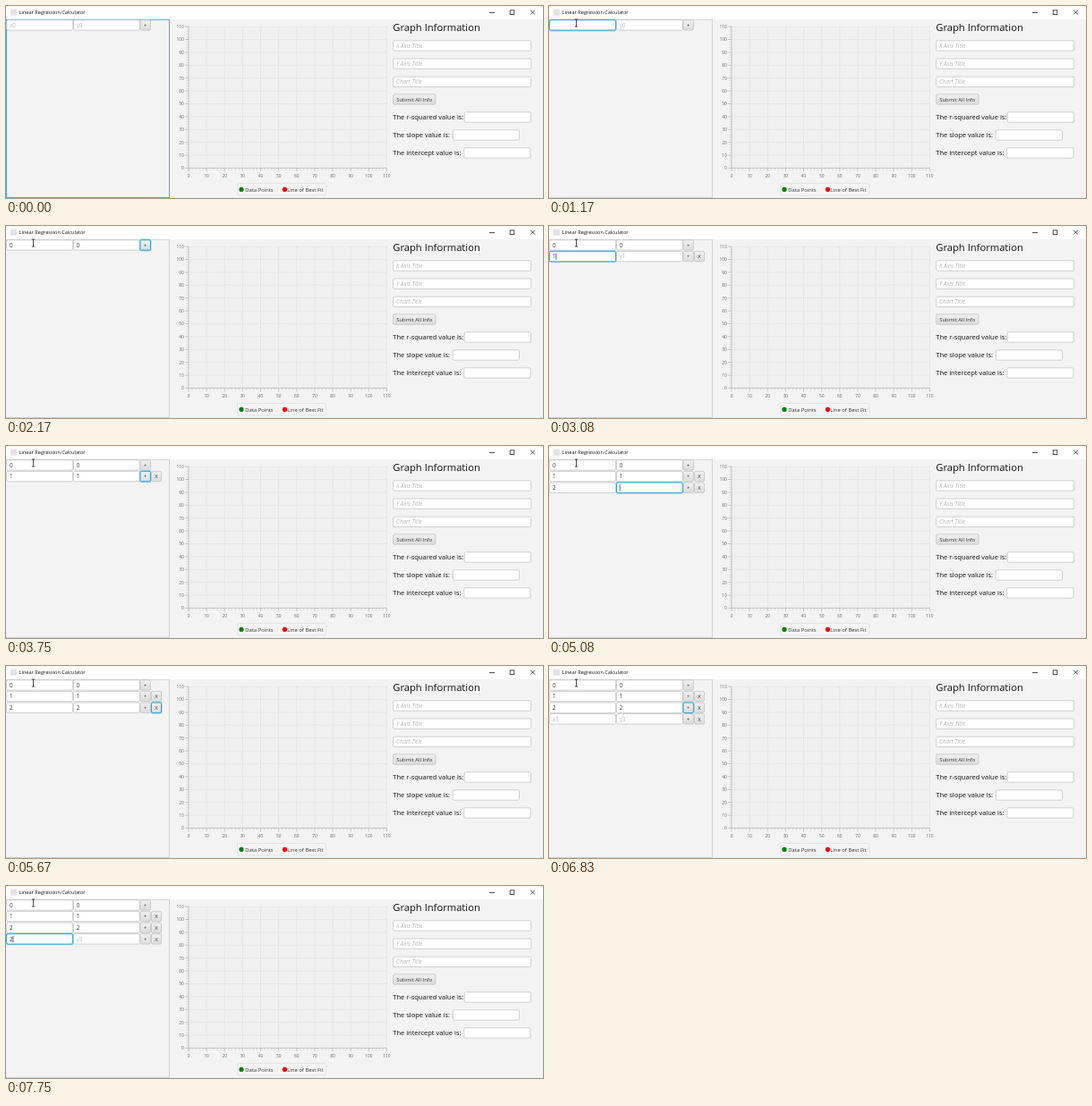
These frames come from a looping animation (600 px wide and 215 px high, 8 s). An HTML page:

```html
<!DOCTYPE html>
<html lang="en">
<head>
<meta charset="utf-8">
<title>Linear Regression Calculator</title>
<style>
html, body { margin: 0; width: 100%; height: 100%; overflow: hidden; background: #f4f3f4; }
svg { display: block; width: 600px; height: 215px; }
text { font-family: "Open Sans", "Noto Sans", sans-serif; fill: #333; white-space: pre; }
</style>
</head>
<body>
<svg id="stage" viewBox="0 0 600 215">
  <defs>
    <linearGradient id="face" x1="0" y1="0" x2="0" y2="1">
      <stop offset="0" stop-color="#f0f0f0"/><stop offset="1" stop-color="#dcdcdc"/>
    </linearGradient>
  </defs>
  <g id="base"></g>
  <g id="table"></g>
  <g id="pointer"></g>
</svg>
<script>
const LOOP = 8000;
const BLUE = '#1a9fc9';
const $ = id => document.getElementById(id);

const rect = (x, y, w, h, fill, stroke = 'none', rx = 0, sw = 1) =>
  `<rect x="${x}" y="${y}" width="${w}" height="${h}" rx="${rx}" fill="${fill}" stroke="${stroke}" stroke-width="${sw}"/>`;
const line = (d, stroke, sw = 1, extra = '') =>
  `<path d="${d}" fill="none" stroke="${stroke}" stroke-width="${sw}" ${extra}/>`;
const text = (x, y, size, str, fill = '#333', anchor = 'start', extra = '') =>
  `<text x="${x}" y="${y}" font-size="${size}" style="fill:${fill}" text-anchor="${anchor}" ${extra}>${str}</text>`;

function box(x, y, w, h, fill, focused) {
  const halo = focused ? rect(x - .2, y - .2, w + .4, h + .4, 'none', '#a5d9e9', 1.8, 1.6) : '';
  return halo + rect(x + .3, y + .3, w - .6, h - .6, fill, focused ? BLUE : '#bfbfbf', 1.4, focused ? .9 : .7);
}
const field = (x, y, w, focused) => box(x, y, w, 12, '#fff', focused);

function button(x, y, w, label, focused, pressed) {
  return box(x, y, w, 12, pressed ? '#cfcfcf' : 'url(#face)', focused) +
    text(x + w / 2, y + 8.2, 5.9, label, '#333', 'middle');
}

function titleBar() {
  return rect(0, 0, 600, 15, '#fff') +
    rect(5, 3.5, 7, 7, '#e6e2e6') +
    text(14.6, 9.3, 5.6, 'Linear Regression Calculator', '#111') +
    line('M540 7.5h6', '#222', .8) +
    rect(563.2, 4.8, 4.6, 4.6, 'none', '#222', 0, .8) +
    line('M586 4.6l5 5M591 4.6l-5 5', '#222', .8);
}

function chart() {
  const x0 = 204, y0 = 181.5, dx = 20.13, dy = 14.4;
  const right = x0 + 11 * dx, top = y0 - 11 * dy;
  let grid = '', major = '', minor = '', labels = '';
  for (let i = 0; i <= 11; i++) {
    const x = x0 + i * dx, y = y0 - i * dy;
    if (i) grid += `M${x} ${top}V${y0}M${x0} ${y}H${right}`;
    major += `M${x} ${y0}v4M${x0} ${y}h-4`;
    labels += text(x, 191.8, 4.8, i * 10, '#666', 'middle') + text(198.8, y + 1.8, 4.8, i * 10, '#666', 'end');
    for (let k = 1; k < 5 && i < 11; k++)
      minor += `M${x + k * dx / 5} ${y0}v2.5M${x0} ${y - k * dy / 5}h-2.5`;
  }
  return rect(x0, top, right - x0, y0 - top, '#f1f0f1') +
    line(grid, '#d8d6d8', .6, 'stroke-dasharray="1.5 1"') +
    line(minor, '#c4c4c4', .5) + line(major, '#a5a5a5', .6) +
    line(`M${x0} ${top}V${y0}H${right}`, '#b0b0b0', .7) + labels +
    rect(258.5, 198.5, 99, 13.5, '#f5f4f5', '#dedede', 2, .7) +
    '<circle cx="263" cy="205.4" r="2.6" fill="#008000"/>' + text(267.3, 207.5, 5.85, 'Data Points') +
    '<circle cx="311.5" cy="205.4" r="2.6" fill="#f00000"/>' + text(314.3, 207.5, 5.9, 'Line of Best Fit');
}

function form() {
  let out = text(432.3, 27.6, 11.2, 'Graph Information', '#111');
  ['X Axis Title', 'Y Axis Title', 'Chart Title'].forEach((name, i) => {
    const y = 38.5 + i * 20.2;
    out += field(432.3, y, 154.7) + text(436, y + 8.4, 6.4, name, '#b5b5b5', 'start', 'font-style="italic"');
  });
  out += button(432.3, 98.5, 48, 'Submit All Info');
  [['r-squared', 512, 74.8], ['slope', 499, 74.8], ['intercept', 511.4, 74.8]].forEach(([name, x, w], i) => {
    const y = 118.5 + i * 20;
    out += text(432.3, y + 8.5, 7.5, `The ${name} value is:`, '#111') + field(x, y, w);
  });
  return out;
}

// Focus moves: time, row, column (0 x, 1 y, 2 plus, 3 remove)
const focusAt = [
  [1000, 0, 0], [1830, 0, 1], [2170, 0, 2], [2750, 1, 0], [3250, 1, 1], [3670, 1, 2],
  [4080, 1, 3], [4250, 2, 0], [5000, 2, 1], [5420, 2, 2], [5670, 2, 3], [6580, 2, 2],
  [7080, 2, 3], [7330, 3, 0]
];
// Each row: time it appears, then x and y values with the time they are typed
const rows = [
  { from: 0, cells: [['0', 1580], ['0', 2000]] },
  { from: 2500, cells: [['1', 3080], ['1', 3420]] },
  { from: 3920, cells: [['2', 4830], ['2', 5250]] },
  { from: 6830, cells: [['2', 7750], ['', LOOP]] }
];
const presses = [[2330, 2500], [3830, 3920], [6750, 6830]];

function drawRow(row, r, t, focus) {
  const y = 15.4 + r * 12.65;
  const on = c => !!focus && focus[1] === r && focus[2] === c;
  let out = '', top = '';
  const put = (c, s) => on(c) ? top += s : out += s;
  row.cells.forEach(([value, typed], c) => {
    const x = c ? 75.2 : .4, has = t >= typed;
    let s = field(x, y, 74.3, on(c));
    if (has) s += text(x + 3.5, y + 8.3, 6.2, value);
    else if (!on(c)) s += text(x + 3.5, y + 8.3, 6.2, 'xy'[c] + r, '#b8b8b8');
    if (on(c) && t >= 1250) {
      const cx = x + (has ? 7.5 : 4);
      s += line(`M${cx} ${y + 2.4}v7.4`, '#222', .7);
    }
    put(c, s);
  });
  const down = on(2) && presses.some(([a, b]) => t >= a && t < b);
  put(2, button(149.7, y, 12, '+', on(2), down));
  if (r) put(3, button(162.2, y, 11.6, 'X', on(3)));
  return out + top;
}

function drawPointer(t) {
  if (t < 750) return '';
  const p = Math.min(1, (t - 750) / 250), e = 1 - (1 - p) ** 2;
  const x = 90 - 59.5 * e, y = 215 - 196 * e;
  if (y > 28)
    return `<path d="M${x} ${y}v8l1.9-1.8 1.3 3 1.2-.6-1.3-2.8h2.6z" fill="#fff" stroke="#111" stroke-width=".5"/>`;
  return line(`M${x - 1.6} ${y - 4}h3.2M${x} ${y - 4}v8M${x - 1.6} ${y + 4}h3.2`, '#222', .8);
}

function render(t) {
  const focus = focusAt.filter(f => t >= f[0]).pop();
  const pane = focus ? line('M0 15.2H182.5V214.5H0', '#cbcbcb', .8)
                     : rect(.5, 15.3, 182, 199.2, 'none', '#4bb0d0', 0, 1);
  $('table').innerHTML = pane +
    rows.map((row, r) => t >= row.from ? drawRow(row, r, t, focus) : '').join('');
  $('pointer').innerHTML = drawPointer(t);
}

$('base').innerHTML = rect(0, 0, 600, 215, '#f4f3f4') + titleBar() + chart() + form();

const start = performance.now();
function tick() {
  render((performance.now() - start) % LOOP);
  requestAnimationFrame(tick);
}
render(0);
requestAnimationFrame(tick);
</script>
</body>
</html>
```
